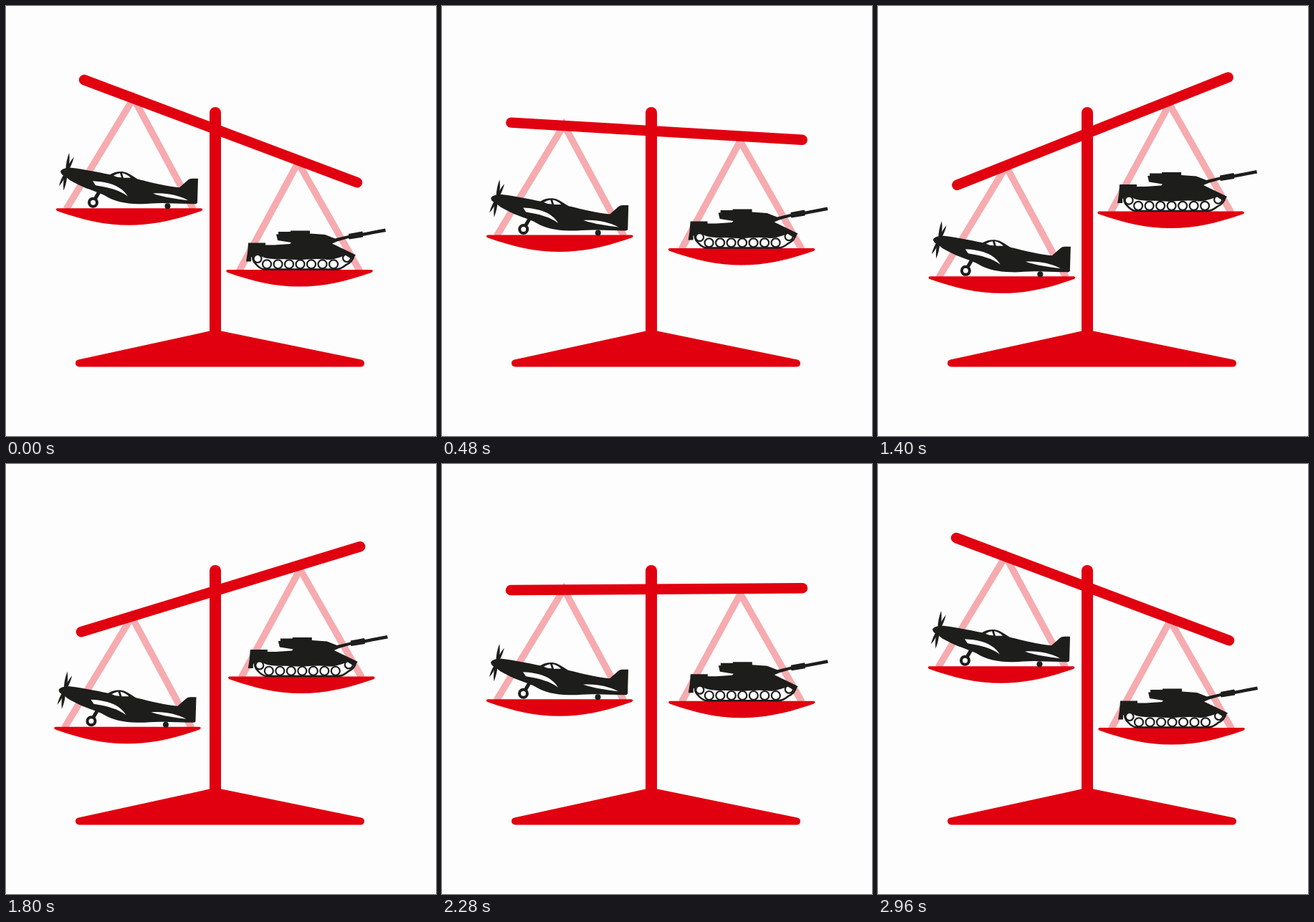
An HTML page for the animation above (3 s loop, 600x600 px).

```html
<!DOCTYPE html>
<html lang="en">
<head>
<meta charset="utf-8">
<title>Scales</title>
<style>
  html, body { margin: 0; width: 100%; height: 100%; overflow: hidden; background: #fefdfe; }
  svg { display: block; width: 100vw; height: 100vh; }
  .red { fill: #e1000f; }
  .beam { stroke: #e1000f; stroke-width: 14.5; stroke-linecap: round; }
  .rods { fill: none; stroke: #f6abaf; stroke-width: 9.5; }
  .ink { fill: #1d1d1b; }
  .line { fill: none; stroke: #1d1d1b; }
  .gap { fill: #fefdfe; }
  .wheel { fill: #fefdfe; stroke: #1d1d1b; stroke-width: 2.2; }
</style>
</head>
<body>
<svg viewBox="0 0 600 600">
  <defs>
    <path id="pan" class="red" d="M-100 -1.5 H100 C103 -1.5 103 1.5 100 2.5 C64 15 34 22 0 22 C-34 22 -64 15 -100 2.5 C-103 1.5 -103 -1.5 -100 -1.5Z"/>
    <path id="blade" d="M-1.5 0 C-3 -9 -2 -18 0 -26 C2 -18 2.5 -9 1.5 0Z"/>
  </defs>

  <!-- both loads are drawn around the centre of their pan -->
  <g id="left">
    <path class="rods" d="M-88 0 L6 -155 L89.500 0"/>
    <use href="#pan"/>
    <g transform="translate(-172 -284)">
      <g class="ink">
        <use href="#blade" transform="translate(85 231) rotate(7)"/>
        <use href="#blade" transform="translate(85 231) rotate(26) scale(.85)"/>
        <use href="#blade" transform="translate(84 232) rotate(188)"/>
        <use href="#blade" transform="translate(84 232) rotate(207) scale(.85)"/>
        <path d="M76 231 C78 227 84 226 91 226 C108 228 128 232 145 235.500 C152 231 162 230 169 233 C175 236 179 239 184 242 C205 247 224 252 242 253.500 L254 243 Q256 241 260 241 H268 L267 275 Q266 277 262 276.500 L222 275.500 C208 275 197 277 185 276.500 C166 276 152 273 140 266 C130 260 112 256 97 247.500 C90 244 86 242 83 237 Q77 237 76 231Z"/>
      </g>
      <path class="gap" d="M150 237 Q154 234 159 233.500 L161 239.500 Q155 239.500 150 237Z M162 233.500 Q169 234.500 174 240 L164 240Z"/>
      <path class="gap" d="M121 244.500 C143 245.500 161 251 170 266 C160 258 144 253.500 125 250.500Z"/>
      <path class="gap" d="M205 262 C222 260.500 240 264 254 271.500 C238 269.500 222 267.500 205 262Z"/>
      <path class="line" stroke-width="5" d="M131 258 L124 270"/>
      <circle class="line" cx="121.500" cy="274.500" r="5.500" stroke-width="4"/>
      <circle class="ink" cx="225.500" cy="279.500" r="4"/>
    </g>
  </g>

  <g id="right">
    <path class="rods" d="M-84 0 L-2 -151 L84 0"/>
    <use href="#pan"/>
    <g transform="translate(-409.500 -369)">
      <path class="gap" d="M343 345 L484 346 L485 354 L464 367 H359 L345 357Z"/>
      <path class="line" stroke-width="2.500" d="M345 345 Q342 354 349 360 Q355 367 362 367 H460 Q467 367 474 361 Q484 356 485 349"/>
      <g id="wheels" class="wheel">
        <circle cx="351" cy="352" r="5.500"/>
        <circle cx="475.500" cy="351" r="5.500"/>
      </g>
      <path class="ink" d="M338 330 H362 V333 H374 L396 331.500 L398 329.500 L379 326.500 L377 318 H380 V314.500 H397 V313 H424 V317 L445 318.500 L459 324 L478 319.500 V317.500 L497 314 L498 316 L529 310 L530 314.500 L498 320.500 V322 L479 325 L478 323.500 L462 328 L455 331 L480 343 L488 347 L483 353 L474 347.500 C462 351 454 355 445 353 C428 351 412 355 396 353 C380 352 370 354 359 350 L350 346 L342 350 V356 H335 L337 343Z"/>
    </g>
  </g>

  <path class="red" stroke="#e1000f" stroke-width="10" stroke-linejoin="round" d="M102 498.500 L292 457 L495 498.500Z"/>
  <path class="red" d="M284 460 V149 A8 8 0 0 1 300 149 V460Z"/>
  <line id="beam" class="beam" x1="-203.500" x2="203.500"/>
</svg>
<script>
const $ = id => document.getElementById(id);
const LOOP = 3000, STEP = 40;

// time in ms, tilt in degrees
const keys = [
  [0, 20.6], [480, 3.4], [880, -11.5], [1120, -18.3], [1440, -21.7],
  [1800, -17], [2280, -0.4], [2800, 19.1], [2960, 20.6], [3000, 20.6]
];

const rate = i => (keys[i + 1][1] - keys[i][1]) / (keys[i + 1][0] - keys[i][0]);
const slopes = keys.map(([t], i) => {
  if (i === 0) return -0.03;
  if (i === keys.length - 1) return 0;
  const before = t - keys[i - 1][0], after = keys[i + 1][0] - t;
  return (rate(i - 1) * after + rate(i) * before) / (before + after);
});

function tiltAt(t) {
  let i = 0;
  while (t >= keys[i + 1][0]) i++;
  const [t0, a] = keys[i], [t1, b] = keys[i + 1];
  const h = t1 - t0, u = (t - t0) / h, v = 1 - u;
  return v * v * (1 + 2 * u) * a + u * u * (3 - 2 * u) * b
       + h * u * v * (v * slopes[i] - u * slopes[i + 1]);
}

const move = (id, x, y, turn = 0) =>
  $(id).setAttribute('transform', `translate(${x} ${y}) rotate(${turn})`);

function draw(t) {
  const tilt = tiltAt(t), rad = tilt * Math.PI / 180;
  const s = Math.sin(rad), c = 1 - Math.cos(rad);
  move('beam', 299.5, 174.7, tilt);
  move('left', 164 + 125 * c, 328.8 - 131.9 * s + 10 * s * s);
  move('right', 418.3 - 137 * c, 333 + 112.5 * s - 25 * s * s);
}

for (let i = 0; i < 7; i++) {
  const wheel = $('wheels').firstElementChild.cloneNode();
  wheel.setAttribute('cx', 364 + 15.5 * i);
  wheel.setAttribute('cy', 359.8);
  wheel.setAttribute('r', 6);
  $('wheels').append(wheel);
}

const start = performance.now();
function tick() {
  const t = (performance.now() - start) % LOOP;
  draw(Math.floor(t / STEP) * STEP);
  requestAnimationFrame(tick);
}
tick();
</script>
</body>
</html>
```
